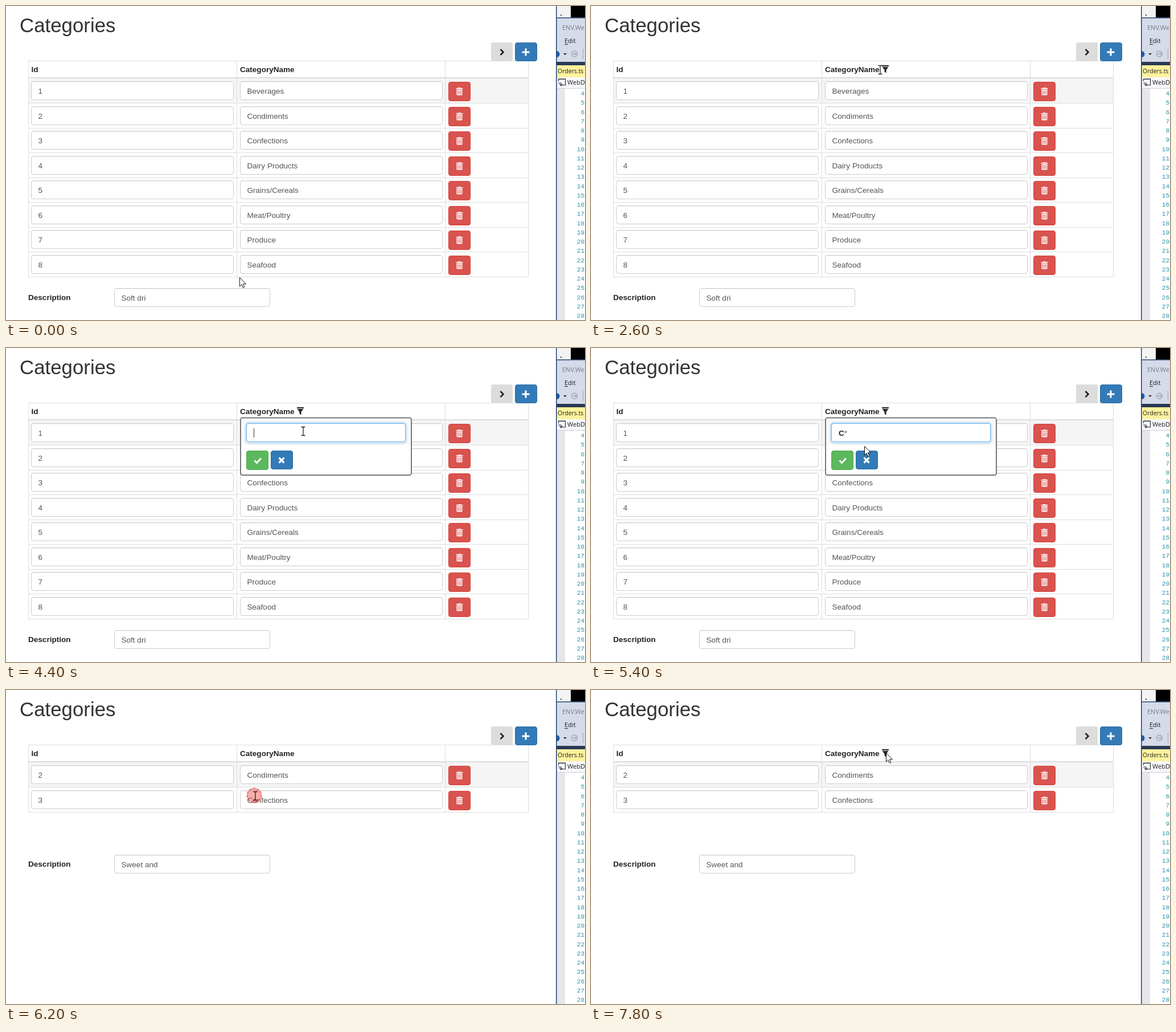
An HTML page for the animation above (8 s loop, 1017 by 551 pixels).

```html
<!DOCTYPE html>
<html lang="en">
<head>
<meta charset="utf-8">
<title>Categories</title>
<style>
html, body { margin: 0; width: 100%; height: 100%; overflow: hidden; background: #fff; }
svg { display: block; width: 100%; height: 100%; }
text { font: 13.55px "Liberation Sans", Arial, sans-serif; fill: #555; white-space: pre; }
.head { font-size: 34.85px; fill: #333; }
.bold { font-weight: bold; fill: #222; }
.ide { font: 11px "Open Sans", "Noto Sans", sans-serif; fill: #1e1e1e; }
.num { font: 11px "Liberation Mono", monospace; fill: #2b91af; text-anchor: end; }
</style>
</head>
<body>
<svg id="stage" viewBox="0 0 1017 551">
  <defs>
    <path id="trash" fill="#fff" fill-rule="evenodd" d="M-6-4.5V-6h4v-1h4v1h4v1.5ZM-5-3.5H5V5.2Q5 6.5 3.7 6.5H-3.7Q-5 6.5-5 5.2ZM-3.5-2V5h1V-2ZM-1.2-2V5h.9V-2ZM1-2V5h.9V-2ZM3-2V5h.8V-2Z"/>
  </defs>
  <rect width="1017" height="551" fill="#fff"/>
  <text class="head" x="24" y="46">Categories</text>
  <g id="tables"></g>
  <g id="tools"></g>
  <g id="detail"></g>
  <g id="ide"></g>
  <path id="funnel" fill="#222" d="M511 104h12v2h-12ZM511.5 107h11l-4 5v5.5l-3-2V112Z"/>
  <g id="popup"></g>
  <circle id="ring" fill="#f04848" stroke="#e02c2c" stroke-width="1.5" stroke-dasharray="5 2"/>
  <g id="pointer">
    <path id="arrow" fill="#fff" stroke="#111" d="M.5.5V16L4 12.6 6.3 18.2 8.8 17.1 6.5 11.7H11.3Z"/>
    <path id="beam" fill="none" stroke="#222" stroke-width="1.3" d="M-3.5-7.5H-1L0-6.5 1-7.5H3.5M0-6.5V6.5M-3.5 7.5H-1L0 6.5 1 7.5H3.5"/>
    <path id="hand" fill="#fff" stroke="#111" stroke-linejoin="round" d="M-2 0Q-2-2 0-2T2 0V6Q4 5 5 7 7 6 8 8 11 7 11 10V15L9 21H0L-5 13Q-6.500 10-4.500 10L-2 12ZM5 7V11M8 8V11M2 6V11"/>
  </g>
</svg>
<script>
const $ = id => document.getElementById(id);
const PITCH = 43.55, TOP = 127, STEP = 200, LOOP = 8000;

const rect = (x, y, w, h, fill, extra = '') =>
  `<rect x="${x}" y="${y}" width="${w}" height="${h}" fill="${fill}" ${extra}/>`;
const box = (x, y, w, h, fill, line, extra = '') =>
  rect(x + .5, y + .5, w - 1, h - 1, fill, `rx="3.5" stroke="${line}" ${extra}`);
const label = (x, y, s, cls = '') => `<text class="${cls}" x="${x}" y="${y}">${s}</text>`;
const path = (d, line, width, extra = '') =>
  `<path d="${d}" fill="none" stroke="${line}" stroke-width="${width}" ${extra}/>`;
const field = (x, y, w, s) =>
  box(x, y, w, 33, '#fff', '#ccc') +
  path(`M${x + 3} ${y + 1.5}h${w - 6}`, '#f1f1f1', 1) +
  label(x + 12.5, y + 21.5, s);

function table(id, rows) {
  const bottom = TOP + rows.length * PITCH;
  let out = rect(39, TOP, 879, PITCH, '#f5f5f5') + rect(39, 0, 879, PITCH, '#f5f5f5', 'class="hover"');
  rows.forEach(([n, name], i) => {
    const y = Math.round(TOP + i * PITCH), end = Math.round(y + PITCH) - .5;
    out += path(`M39 ${end}H918`, '#ddd', 1) +
      field(44, y + 5, 356, n) + field(411, y + 5, 356, name) +
      box(777, y + 6, 39, 34, '#d9534f', '#d43f3a') +
      `<use href="#trash" x="796.500" y="${y + 23}"/>`;
  });
  out += path('M39 126H918', '#ddd', 2) +
    path(`M39.500 ${bottom}V96.500H917.500V${bottom}M405.500 96V${bottom}M771.500 96V${bottom}`, '#ddd', 1) +
    label(44.5, 116, 'Id', 'bold') + label(411, 116, 'CategoryName', 'bold');
  return `<g id="${id}">${out}</g>`;
}

const names = ['Beverages', 'Condiments', 'Confections', 'Dairy Products',
  'Grains/Cereals', 'Meat/Poultry', 'Produce', 'Seafood'];
const rows = names.map((s, i) => [i + 1, s]);
$('tables').innerHTML = table('full', rows) + table('short', rows.filter(r => r[1][0] === 'C'));

$('tools').innerHTML =
  rect(852, 64, 38, 33, '#dcdcdc', 'rx="3"') +
  path('M868.500 76l5 5-5 5', '#222', 2.6) +
  box(894, 64, 39, 33, '#337ab7', '#2e6da4') +
  path('M906.500 81h13M913 74.500v13', '#fff', 3);

$('detail').innerHTML = label(39, 516, 'Description', 'bold') + field(190, 495, 274, 'Soft dri');
const note = $('detail').lastElementChild;

function ide() {
  let out = rect(967, 0, 50, 551, '#fff') + rect(969, 0, 23, 20, '#f3f3f3') +
    rect(992, 0, 25, 20, '#000') + rect(974, 15, 2, 2, '#444') +
    rect(967, 20, 50, 79, '#d6dbe9') + rect(967, 20, 50, 1.5, '#2f4a75') +
    rect(967, 98, 50, 7, '#293955') + rect(967, 104, 50, 21, '#fff29d') +
    rect(967, 125, 50, 20, '#f7f8fb') + rect(967, 144, 50, 1, '#ccced8') +
    rect(968, 145, 14, 406, '#e6e7e8') +
    label(977, 42, 'ENV.We', 'ide') + label(981, 65, 'Edit', 'ide') +
    path('M981 67.500h6', '#1e1e1e', 1) +
    '<path d="M967 79a5 5 0 0 1 0 11Z" fill="#1d5ba8"/><path d="M979 83h6l-3 3Z" fill="#222"/>' +
    '<circle cx="998.500" cy="84" r="5" fill="none" stroke="#a2a8b5" stroke-width="1.500"/>' +
    path('M995.500 84h6m-2-2l2 2-2 2', '#a2a8b5', 1.3) + path('M1013.500 75v18', '#9aa3b8', 1) +
    label(969, 118, 'Orders.ts', 'ide') + label(986, 138, 'WebD', 'ide') +
    path('M970.500 132v-4h12v11h-5M970 128.500h13M970 135h5m0 0v4m-3-2l3 3 3-3', '#333', 1.2);
  for (let n = 4; n <= 28; n++) out += label(1016, 157 + (n - 4) * 16.26, n, 'num');
  return out + rect(966, 0, 1.6, 551, '#294a78');
}
$('ide').innerHTML = ide();
$('ide').querySelector('.ide').style.fill = '#777b88';
$('ide').querySelectorAll('.ide')[2].style.fontSize = '10.5px';

$('popup').innerHTML =
  rect(412, 122.5, 300, 100.5, '#fff', 'rx="3.500" stroke="#777" stroke-width="2"') +
  rect(413, 124, 298, 46, '#f9f9f9') +
  rect(421, 131, 282, 36, 'none', 'id="glow" rx="5" stroke="#66afe9" stroke-opacity=".3" stroke-width="3"') +
  box(422, 132, 280, 33, '#fff', '#ccc', 'id="entry"') +
  '<text x="435" y="153.500"><tspan id="typed" class="bold"></tspan><tspan id="star">*</tspan></text>' +
  rect(435, 141, 1, 16, '#333', 'id="caret"') +
  box(422, 180, 39, 34, '#5cb85c', '#4cae4c', 'id="ok"') +
  path('M436.500 197.500l4 4 7.500-8', '#fff', 3) +
  box(465, 180, 39, 33, '#337ab7', '#2e6da4') +
  path('M479.500 192.500l9 9m0-9l-9 9', '#fff', 3.2);

// time, x, y, shape
const track = [
  [0, 410, 476, 'arrow'], [400, 410, 476, 'arrow'], [600, 418, 452, 'beam'],
  [1400, 541, 172, 'arrow'], [1600, 553, 138, 'beam'], [1800, 545, 122, 'arrow'],
  [2200, 518, 112, 'arrow'], [2400, 518, 112, 'arrow'], [2600, 508, 112, 'beam'],
  [2800, 517.5, 111, 'arrow'], [3400, 517.5, 111, 'arrow'], [3600, 520, 118, 'arrow'],
  [3800, 521, 131, 'beam'], [4000, 522, 146, 'beam'], [5000, 522, 146, 'beam'],
  [5200, 505, 152, 'beam'], [5400, 480, 172, 'arrow'], [5600, 455, 184, 'hand'],
  [5800, 437.5, 187, 'hand'], [6000, 437.5, 187, 'hand'], [6200, 438, 186, 'beam'],
  [6400, 438, 186, 'beam'], [7200, 505, 122, 'arrow'], [7400, 515, 118, 'arrow'],
  [7800, 517.5, 110, 'arrow'], [LOOP, 517.5, 110, 'arrow']
];
const clicks = [[3200, 518, 112], [4000, 522, 146], [6200, 436, 185]];

function pointerAt(t) {
  const i = track.findIndex(k => k[0] > t);
  const a = track[i - 1], b = track[i], p = (t - a[0]) / (b[0] - a[0]);
  return { x: a[1] + (b[1] - a[1]) * p, y: a[2] + (b[2] - a[2]) * p, shape: a[3] };
}

const show = (el, on) => { el.style.display = on ? '' : 'none'; };
const set = (el, attrs) => { for (const k in attrs) el.setAttribute(k, attrs[k]); };

function draw(time) {
  const t = Math.floor(time % LOOP / STEP) * STEP;
  const filtered = t >= 6200, open = t >= 3200 && !filtered, focus = t >= 4000;
  const p = pointerAt(t);

  show($('full'), !filtered);
  show($('short'), filtered);
  const row = Math.floor((p.y - TOP) / PITCH);
  document.querySelectorAll('.hover').forEach(el => {
    show(el, !filtered && !open && row >= 0 && row < 8);
    el.setAttribute('y', TOP + row * PITCH);
  });
  set($('detail'), { transform: `translate(0 ${filtered ? -206 : 0})` });
  note.textContent = filtered ? 'Sweet and' : 'Soft dri';
  show($('funnel'), t >= 1800 && t < 6200 || t >= 7200);

  show($('popup'), open);
  show($('glow'), focus);
  set($('entry'), { stroke: focus ? '#66afe9' : '#ccc' });
  show($('caret'), focus && t < 4600);
  $('typed').textContent = t >= 4600 ? 'C' : '';
  show($('star'), t >= 4800);
  const green = t >= 6000 ? ['#398439', '#4a86c0'] : t >= 5600 ? ['#449d44', '#398439'] : ['#5cb85c', '#4cae4c'];
  set($('ok'), { fill: green[0], stroke: green[1] });

  const hit = clicks.find(c => t >= c[0] && t < c[0] + 2 * STEP);
  show($('ring'), hit);
  if (hit) {
    const late = t > hit[0];
    set($('ring'), { cx: hit[1], cy: hit[2], r: late ? 17 : 12.5,
      'fill-opacity': late ? .3 : .45, 'stroke-opacity': late ? .5 : .75 });
  }

  for (const s of ['arrow', 'beam', 'hand']) show($(s), s === p.shape);
  set($('pointer'), { transform: `translate(${Math.round(p.x)} ${Math.round(p.y)})` });
}

const start = performance.now();
function tick() {
  draw(performance.now() - start);
  requestAnimationFrame(tick);
}
tick();
</script>
</body>
</html>
```
